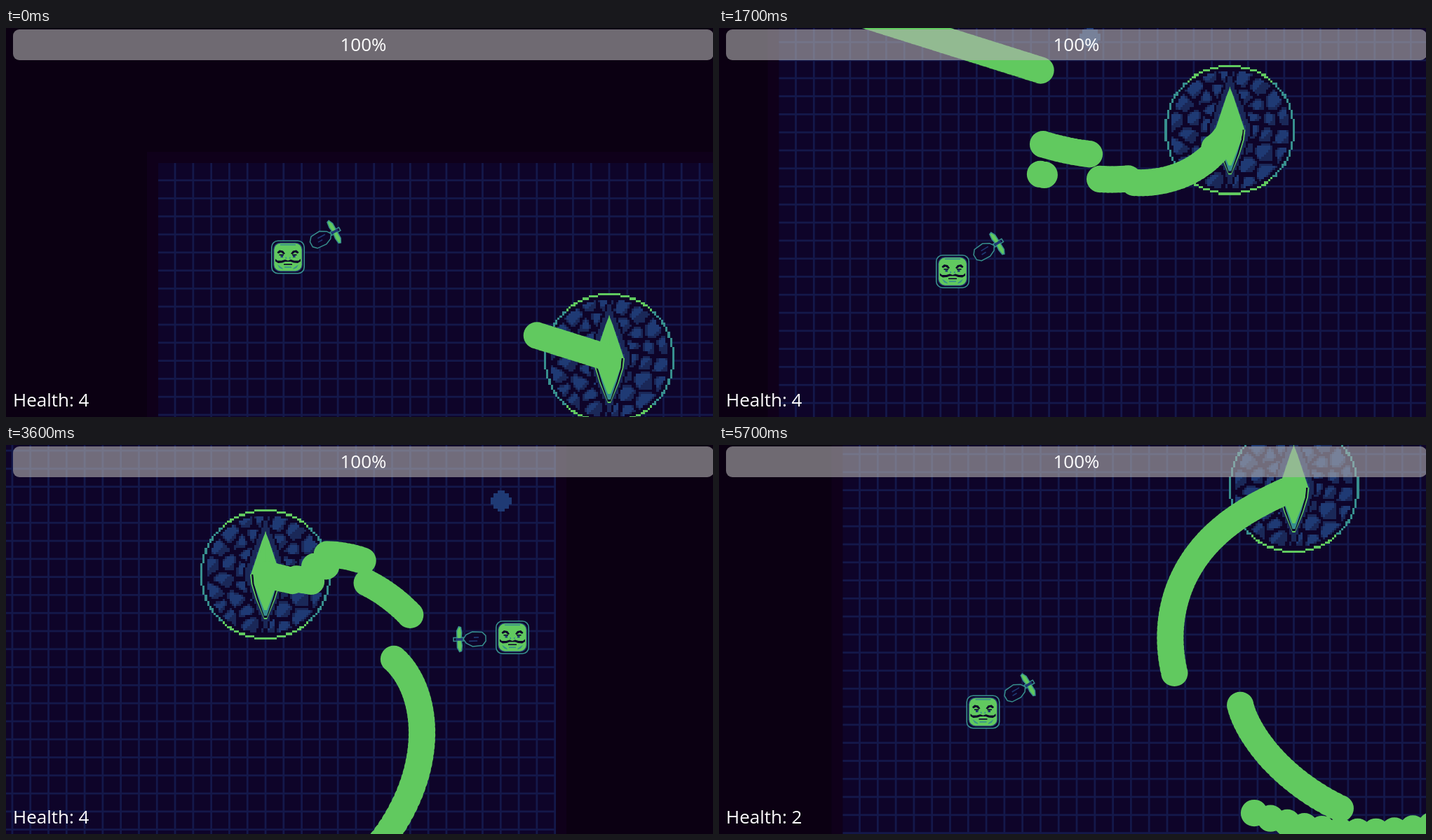
Write an HTML page with a canvas that moves like this. It is 1008 px wide and 556 px high and loops after 5.8 s.

```html
<!DOCTYPE html>
<html lang="en">
<head>
<meta charset="utf-8">
<title>Boss fight</title>
<style>
  html, body { margin: 0; width: 1008px; height: 556px; overflow: hidden; background: #0b0012; }
  canvas { display: block; }
  div { position: absolute; box-sizing: border-box; color: #fff; font: 500 26px/35px "Open Sans", "Noto Sans", sans-serif; white-space: pre; }
  #bar { left: 10px; top: 2px; width: 999px; height: 44px; padding-top: 4px; border-radius: 9px;
         background: rgba(178, 177, 178, .6); text-align: center; }
  #health { left: 10px; top: 514px; }
</style>
</head>
<body>
<canvas id="stage" width="1008" height="556"></canvas>
<div id="bar">100%</div>
<div id="health">Health: 4</div>
<script>
const LOOP = 5800, STEP = 100, SHOT_GAP = 1000 / 60, SPEED = 0.318, FIRST_SHOT = -340;
const C = { void: '#0b0012', rim: '#0f001a', floor: '#0e0429', grid: '#14184a',
            green: '#61c95f', teal: '#378f8e', blue: '#1f3a74', navy: '#1a2858' };
const ROOM = { left: -643, top: -279, right: 413, bottom: 800 };
const CELL = 25.79;

// The boss is the world origin; cam is its place on screen, aim is in degrees.
const KEYS = [
  { t: 0,    cam: [860, 472],     player: [-458, -144.5],  aim: -28.6 },
  { t: 800,  cam: [793, 460],     player: [-458, -144.5],  aim: -17 },
  { t: 1300, cam: [819.5, 229.5], player: [-497.5, 64.5],  aim: -11 },
  { t: 2200, cam: [529, 95],      player: [-149, 300],     aim: -80 },
  { t: 3000, cam: [298, 177],     player: [254, 260],      aim: -142.6 },
  { t: 3600, cam: [370, 185],     player: [352, 90],       aim: -182 },
  { t: 4200, cam: [443, 77.3],    player: [233, 143],      aim: -198 },
  { t: 4900, cam: [589, 73],      player: [-64, 320],      aim: -59 },
  { t: 5700, cam: [819.5, 61],    player: [-443, 320.5],   aim: -31 }
].map(k => [k.t, ...k.cam, ...k.player, k.aim]);

// Each sweep of the boss's fire: start time, first and last angle, ease-out power
const SWEEPS = [
  [FIRST_SHOT, 197.5, 197.5], [820, 167, 166], [855, 175.7, 170], [1067, 159.6, 153.6],
  [1210, 151, 123.5], [1590, 131, 100, 1.6], [1930, 117.1, 115.3], [2015, 98.3, 96],
  [2080, 84.7, 33.4, 1.5], [2920, 16, 4.6], [3147, -7.2, -19], [3325, -7.7, -9.5],
  [3390, 8.7, 8.3], [3475, 13.4, 13.7], [3635, 42, 42], [3650, 13.7, 13.8], [3750, 9, 9.5],
  [3845, 14.4, 14.4], [3881, 52, 60], [3990, 55.7, 97.5], [4230, 81, 104, 1.2], [4703, 122.3, 157, 1.9]
];

const ctx = document.getElementById('stage').getContext('2d');
const health = document.getElementById('health');
const rad = deg => deg * Math.PI / 180;

function slope(i, c) {
  if (!i || i === KEYS.length - 1) return 0;
  const [a, b, d] = [KEYS[i - 1], KEYS[i], KEYS[i + 1]];
  const before = (b[c] - a[c]) / (b[0] - a[0]), after = (d[c] - b[c]) / (d[0] - b[0]);
  return before * after <= 0 ? 0 : 2 * before * after / (before + after);
}

// Smooth monotone curve through the keys
function pose(t) {
  const i = Math.min(KEYS.findLastIndex(k => k[0] <= t), KEYS.length - 2);
  const a = KEYS[i], b = KEYS[i + 1], span = b[0] - a[0];
  const u = (t - a[0]) / span, v = 1 - u;
  return [1, 2, 3, 4, 5].map(c =>
    a[c] * v * v * (1 + 2 * u) + b[c] * u * u * (3 - 2 * u) +
    span * u * v * (slope(i, c) * v - slope(i + 1, c) * u));
}

function fireAngle(t) {
  const i = SWEEPS.findLastIndex(s => s[0] <= t);
  const [start, from, to, power = 1] = SWEEPS[i];
  const end = i + 1 < SWEEPS.length ? SWEEPS[i + 1][0] : LOOP;
  return rad(from + (to - from) * (1 - (1 - (t - start) / (end - start)) ** power));
}

const shots = [];
for (let t = FIRST_SHOT; t < LOOP; t += SHOT_GAP) {
  const a = fireAngle(t);
  shots.push({ t, x: Math.cos(a) * SPEED, y: Math.sin(a) * SPEED });
}

function trace(pts) {
  ctx.beginPath();
  for (let i = 0; i < pts.length; i += 2) ctx.lineTo(pts[i], pts[i + 1]);
  ctx.closePath();
}

function poly(fill, ...pts) {
  trace(pts);
  ctx.fillStyle = fill;
  ctx.fill();
}

function rect(fill, x, y, w, h) {
  ctx.fillStyle = fill;
  ctx.fillRect(x, y, w, h);
}

function roundBox(half, r, fill, stroke) {
  ctx.beginPath();
  ctx.roundRect(-half, -half, half * 2, half * 2, r);
  ctx.fillStyle = fill;
  ctx.fill();
  if (stroke) { ctx.strokeStyle = stroke; ctx.stroke(); }
}

function bothSides(sx, sy, draw) {
  draw();
  ctx.save();
  ctx.scale(sx, sy);
  draw();
  ctx.restore();
}

// Cracked stone disc, built once as coarse pixels
function makeStone() {
  const size = 58, canvas = document.createElement('canvas');
  canvas.width = canvas.height = size;
  const g = canvas.getContext('2d');
  let seed = 11;
  const random = () => (seed = seed * 16807 % 2147483647) / 2147483647;
  const seeds = [];
  for (let ring = 0; ring < 3; ring++) {
    const count = 8 + ring * 5;
    for (let i = 0; i < count; i++) {
      const a = (i + random() * .6) / count * 2 * Math.PI, d = 11 + ring * 6.5 + random() * 4 - 2;
      seeds.push([Math.cos(a) * d, Math.sin(a) * d]);
    }
  }
  for (let j = 0; j < size; j++) for (let i = 0; i < size; i++) {
    const x = i - 28.5, y = j - 28.5, d = Math.hypot(x, y);
    if (d > 29) continue;
    const halo = Math.abs(x) / 9.5 + Math.abs(y) / 25;
    let color = C.floor;
    if (d > 28) color = Math.abs(y) > 20.5 ? C.green : C.teal;
    else if (halo < .75) color = C.blue;
    else if (halo < 1) color = C.navy;
    else if (d < 26.5 && halo > 1.12) {
      const [near, next] = seeds.map(([sx, sy]) => ({ d: Math.hypot(x - sx, y - sy), lit: sx - x + sy - y }))
        .sort((m, n) => m.d - n.d);
      const depth = next.d - near.d;
      if (depth > 1.5) color = depth > 2.6 && near.lit > -1.5 ? C.blue : C.navy;
    }
    g.fillStyle = color;
    g.fillRect(i, j, 1, 1);
  }
  return canvas;
}
const stone = makeStone();

function drawRoom() {
  const { left, top, right, bottom } = ROOM, w = right - left, h = bottom - top;
  rect(C.rim, left - 16, top - 16, w + 32, h + 32);
  rect(C.floor, left, top, w, h);
  for (let i = -24; i <= 16; i++) rect(C.grid, i * CELL - 1.4, top, 2.8, h);
  for (let i = -10; i <= 30; i++) rect(C.grid, left, i * CELL + 2.2, w, 2.8);
}

function drawBoss() {
  ctx.imageSmoothingEnabled = false;
  ctx.drawImage(stone, -93, -93, 186, 186);
  const lower = (fill, w, h) => poly(fill, w, 0, w * .93, 14, w * .62, h * .56, 2, h, -2, h, -w * .62, h * .56, -w * .93, 14, -w, 0);
  bothSides(-1, 1, () => poly(C.green, -.5, -62, 5, -48, 13, -24, 21, 0, -.5, 0));
  lower(C.green, 22, 64);
  lower(C.floor, 20, 62);
  lower(C.teal, 17.5, 59);
  lower(C.green, 17.5, 51);
}

function drawDot(x, y) {
  ctx.save();
  ctx.translate(x, y);
  rect(C.blue, -11, -11, 22, 22);
  rect(C.blue, -5, -15, 10, 30);
  rect(C.blue, -15, -5, 30, 10);
  ctx.restore();
}

function drawShots(t) {
  ctx.fillStyle = C.green;
  ctx.beginPath();
  for (const s of shots) {
    if (s.t > t) break;
    const x = s.x * (t - s.t), y = s.y * (t - s.t);
    if (x < ROOM.left || x > ROOM.right || y < ROOM.top || y > ROOM.bottom) continue;
    ctx.moveTo(x + 19, y);
    ctx.arc(x, y, 19.2, 0, 7);
  }
  ctx.fill();
}

function drawPlayer() {
  ctx.lineWidth = 1.6;
  roundBox(23.2, 9, C.floor, C.teal);
  roundBox(21, 10, C.blue);
  roundBox(19.7, 9, C.green);
  rect(C.teal, -11, -18.5, 22, 1.6);
  bothSides(-1, 1, () => {
    poly(C.floor, 4, -5, 7, -9, 12, -10, 15.5, -7, 14, -5, 10, -7, 6, -4);
    rect(C.floor, 6, -4, 6.5, 1.6);
    rect(C.blue, 7, -2.5, 3.5, 3);
    poly(C.floor, 0, 5, 4, 3.5, 9, 5, 15, 5, 18, 2.5, 18, 6, 14, 8.5, 8, 8, 4, 6.5, 0, 6.5);
    rect(C.teal, 2, 0, 1.6, 2.5);
    poly(C.teal, 13, 12, 15, 11, 12, 15.5, 7, 17.5, 8, 15.5);
  });
  rect(C.floor, -6, 9.5, 12, 1.6);
  rect(C.teal, -5, 13.5, 10, 1.6);
}

function drawDagger(aim) {
  ctx.rotate(rad(aim));
  ctx.lineWidth = 1.5;
  ctx.strokeStyle = C.teal;
  trace([38, -4, 43, -10, 57, -11, 66, -6, 70, 0, 66, 6, 57, 10, 43, 9, 38, 4]);
  ctx.fillStyle = C.floor;
  ctx.fill();
  ctx.stroke();
  rect(C.blue, 50, -4, 12, 1.6);
  rect(C.blue, 48, 1, 7, 1.6);
  ctx.strokeRect(70, -2.5, 14, 5);
  bothSides(1, -1, () => {
    poly(C.green, 73, 1, 72, 9, 73, 17, 76, 18, 79, 12, 79, 1);
    ctx.stroke();
  });
  rect(C.blue, 71, -2, 10, 3.5);
}

function draw(t) {
  const [bx, by, px, py, aim] = pose(t);
  rect(C.void, 0, 0, 1008, 556);
  ctx.save();
  ctx.translate(bx, by);
  drawRoom();
  if (t >= 900 && t < 2300) drawDot(-199.5, -132.5);
  if (t >= 2400) drawDot(336, -105);
  drawBoss();
  drawShots(t);
  ctx.translate(px, py);
  drawPlayer();
  drawDagger(aim);
  ctx.restore();
  health.textContent = 'Health: ' + (t < 3700 ? 4 : t < 4500 ? 3 : 2);
}

const start = performance.now();
let shown = -1;
function tick() {
  const t = Math.floor((performance.now() - start) % LOOP / STEP) * STEP;
  if (t !== shown) draw(shown = t);
  requestAnimationFrame(tick);
}
tick();
</script>
</body>
</html>
```
